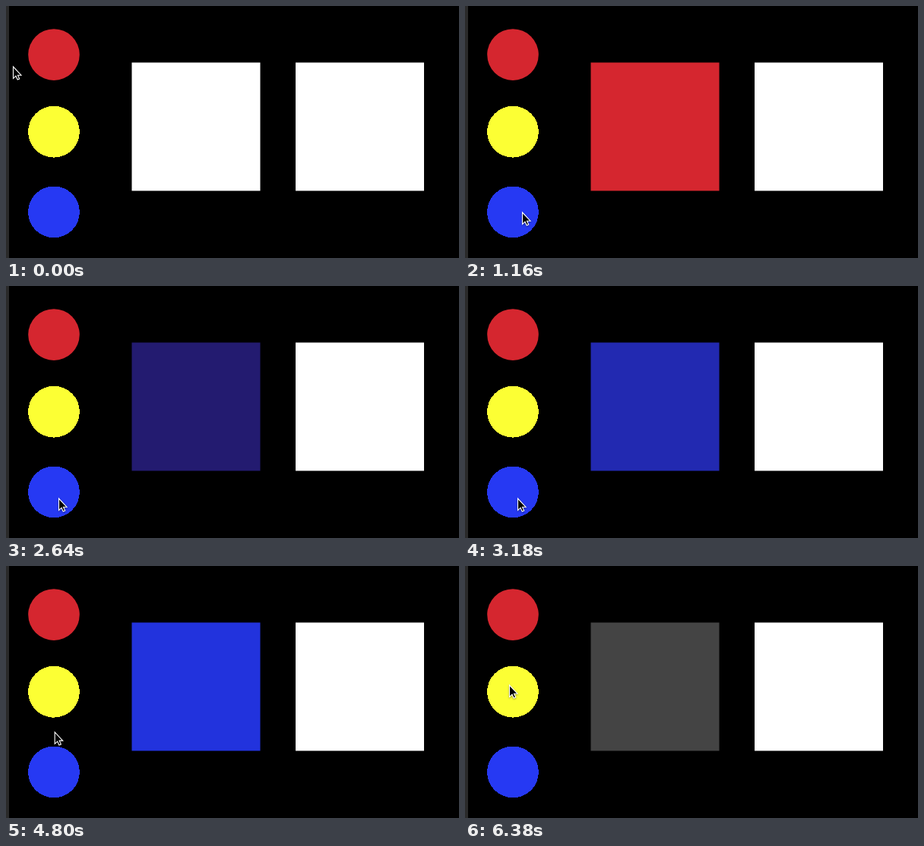
These frames come from a looping animation (596 px wide and 332 px high, 7860 ms). An HTML page:

```html
<!DOCTYPE html>
<html lang="en">
<head>
<meta charset="utf-8">
<title>Colour picker</title>
<style>
  html, body { margin: 0; width: 100%; height: 100%; overflow: hidden; background: #000; }
  svg { display: block; }
  .crisp { shape-rendering: crispEdges; }
  #pointer { stroke: #fff; stroke-width: 1.1; filter: drop-shadow(0 1px 1px #0006); }
</style>
</head>
<body>
<svg width="596" height="332">
  <rect width="4" height="332" fill="#2a2a2a"/>
  <circle cx="63" cy="64.1" r="33.8" fill="#d5262f"/>
  <circle class="crisp" cx="63" cy="165.7" r="33.9" fill="#fcff34"/>
  <circle class="crisp" cx="63" cy="271.4" r="33.9" fill="#2639f3"/>
  <rect id="swatch" x="165.5" y="74.5" width="169" height="169"/>
  <rect x="381" y="74.5" width="169" height="169" fill="#fff"/>
  <path id="pointer" d="M.5 1V16.4L4 13.2 6.2 18 8.7 17 6.5 12.2H11Z"/>
</svg>
<script>
const LOOP = 7860, STEP = 20;
const swatch = document.getElementById('swatch');
const pointer = document.getElementById('pointer');

const home = { x: 9, y: 79 };
const moves = [
  { from: 20, to: 400, x: 48, y: 64 },
  { from: 680, to: 1160, x: 75, y: 271 },
  { from: 1160, to: 1400, x: 69, y: 279 },
  { from: 4680, to: 4940, x: 57, y: 141 },
  { from: 5160, to: 5300, x: 58, y: 156 }
];
const clicks = { red: 480, blue: 1860, yellow: 5680 };
const navy = [35, 27, 112], blue = [34, 51, 221];

// The blue mix advances at an even rate, with pauses between these spans.
const mixing = [[2640, 2700], [2820, 3180], [3400, 3680]];

const ramp = (t, from, to) => Math.min(1, Math.max(0, (t - from) / (to - from)));
const lerp = (a, b, p) => a + (b - a) * p;
const smooth = p => p * p * (3 - 2 * p);

function pointerAt(t) {
  return moves.reduce((at, move) => {
    const p = smooth(ramp(t, move.from, move.to));
    return { x: lerp(at.x, move.x, p), y: lerp(at.y, move.y, p) };
  }, home);
}

function blueMix(t) {
  let done = 0, total = 0;
  for (const [from, to] of mixing) {
    done += ramp(t, from, to) * (to - from);
    total += to - from;
  }
  return `rgb(${navy.map((v, i) => Math.round(lerp(v, blue[i], done / total)))})`;
}

function swatchAt(t) {
  if (t < clicks.red) return '#fff';
  if (t < clicks.blue) return '#d5262f';
  return t < clicks.yellow ? blueMix(t) : '#444';
}

function draw(now) {
  const t = Math.floor(now % LOOP / STEP) * STEP;
  const { x, y } = pointerAt(t);
  swatch.setAttribute('fill', swatchAt(t));
  pointer.setAttribute('transform', `translate(${x} ${y})`);
}

const start = performance.now();
function tick() {
  draw(performance.now() - start);
  requestAnimationFrame(tick);
}
tick();
</script>
</body>
</html>
```
